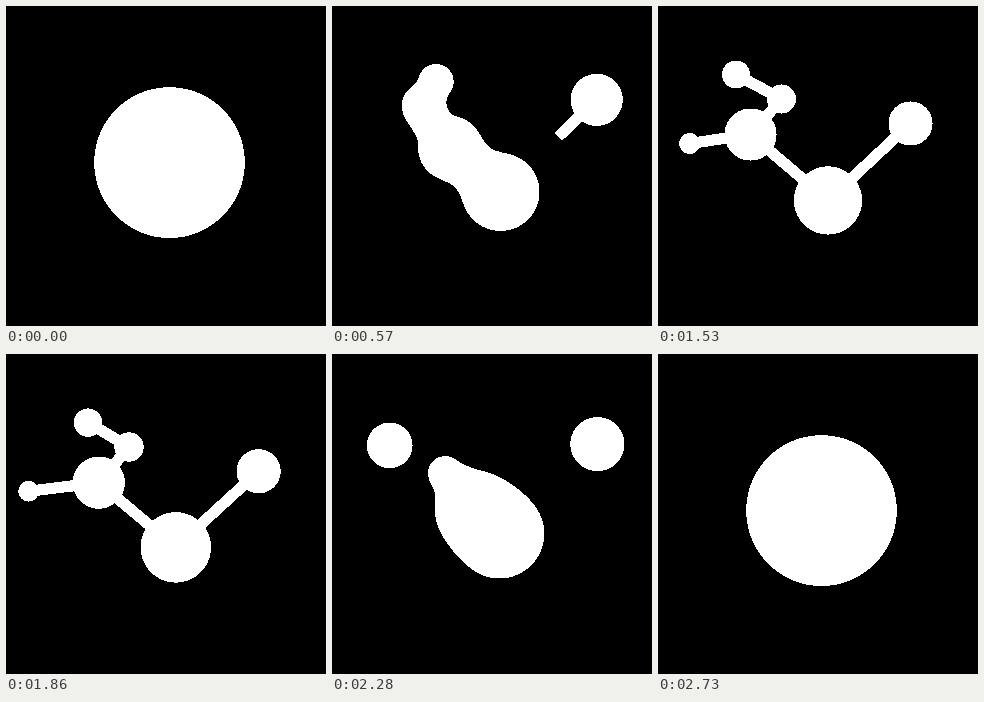
An HTML page with a canvas that plays this animation: 320 by 320 pixels, repeating every 2760 ms.

```html
<!DOCTYPE html>
<html lang="en">
<head>
<meta charset="utf-8">
<title>Splitting drop</title>
<style>
  html, body { margin: 0; width: 100%; height: 100%; overflow: hidden; background: #000; }
  canvas { display: block; width: 100vmin; height: 100vmin; }
</style>
</head>
<body>
<canvas id="stage" width="320" height="320"></canvas>
<script>
const SIZE = 320, STEP = 30, STEPS = 92;
const WHITE = 0xffffffff, BLACK = 0xff000000;
const ROD_HALF = 5.6, ROD_STEPS = 4;
const ctx = document.getElementById('stage').getContext('2d');
const image = ctx.createImageData(SIZE, SIZE);
const pixels = new Uint32Array(image.data.buffer);

// Every ball eases from one [x, y, radius] to another; pushes throw it off that path for a while.
// settle: steps the easing takes, power: how abruptly it ends, goo: width of the liquid blend.
const balls = {
  main: { from: [163.5, 156.5, 75.3], to: [170, 194.5, 34], settle: 15.5, power: 2, goo: 28,
    pushes: [{ at: 16, width: 6, by: [0, 0, -5.5] }] },
  left: { from: [163, 166, 43], to: [92.5, 128.5, 26], settle: 19, power: 4, goo: 28, pushes: [] },
  knee: { from: [163, 156, 5], to: [123.5, 93, 14.5], settle: 15.5, power: 4, goo: 16,
    pushes: [{ at: 18, width: 5.3, by: [-37, 0, 9] }] },
  top: { from: [163, 160, 52], to: [78, 68.5, 14], settle: 12.4, power: 2, goo: 9,
    pushes: [{ at: 14, width: 3.5, by: [-45, 2, 0] }, { at: 22.5, width: 4, by: [51, -4, 0] }] },
  tip: { from: [163, 125, 4], to: [31.7, 137.5, 10.4], settle: 20.6, power: 4, goo: 20,
    pushes: [{ at: 21, width: 3, by: [0, -22, 2] }, { at: 28, width: 3, by: [-13, 0, 0] }] },
  right: { from: [163, 156, 36], to: [252.5, 117.5, 22], settle: 7.6, power: 2, goo: 20,
    pushes: [{ at: 16.3, width: 5.7, by: [15.5, -29.7, 5] }] }
};

// Each rod grows from the first ball to the second.
const rods = [
  { from: 'right', to: 'main', start: 17.4 },
  { from: 'left', to: 'main', start: 22.5 },
  { from: 'knee', to: 'left', start: 22.5 },
  { from: 'top', to: 'knee', start: 22.5 },
  { from: 'tip', to: 'left', start: 22.5 }
];

const clamp = v => Math.min(1, Math.max(0, v));
const decay = (t, scale, power) => Math.exp(-((Math.abs(t) / scale) ** power));

function placeBall({ from, to, settle, power, goo, pushes }, step) {
  const remaining = decay(step, settle, power);
  const [x, y, r] = to.map((end, i) => pushes.reduce(
    (sum, push) => sum + push.by[i] * decay(step - push.at, push.width, 2),
    end + (from[i] - end) * remaining));
  return { x, y, r, goo: goo * (1 - 0.85 * clamp((step - 22) / 7)) };
}

function placeRod(a, b, growth) {
  const dx = b.x - a.x, dy = b.y - a.y, length = Math.hypot(dx, dy);
  return { x: a.x, y: a.y, ux: dx / length, uy: dy / length, reach: length * growth };
}

function inRod(rod, x, y) {
  const dx = x - rod.x, dy = y - rod.y;
  const along = dx * rod.ux + dy * rod.uy;
  return along > 0 && along < rod.reach && Math.abs(dx * rod.uy - dy * rod.ux) < ROD_HALF;
}

function smoothMin(a, b, k) {
  const h = Math.max(k - Math.abs(a - b), 0) / k;
  return Math.min(a, b) - h * h * k / 4;
}

function draw(step) {
  const placed = {};
  for (const name in balls) placed[name] = placeBall(balls[name], step);
  const blobs = Object.values(placed);
  const bars = rods.filter(rod => step > rod.start).map(rod =>
    placeRod(placed[rod.from], placed[rod.to], clamp((step - rod.start) / ROD_STEPS)));

  for (let n = 0; n < pixels.length; n++) {
    const x = n % SIZE + 0.5, y = Math.floor(n / SIZE) + 0.5;
    let distance = SIZE * 2;
    for (const b of blobs) {
      const dx = x - b.x, dy = y - b.y;
      distance = smoothMin(distance, Math.sqrt(dx * dx + dy * dy) - b.r, b.goo);
    }
    pixels[n] = distance < 0 || bars.some(bar => inRod(bar, x, y)) ? WHITE : BLACK;
  }
  ctx.putImageData(image, 0, 0);
}

const begin = performance.now();
let shown = -1;
function tick() {
  const index = Math.floor((performance.now() - begin) / STEP) % STEPS;
  const step = Math.min(index, STEPS - 1 - index); // out, then back the same way
  if (step !== shown) draw(shown = step);
  requestAnimationFrame(tick);
}
tick();
</script>
</body>
</html>
```
